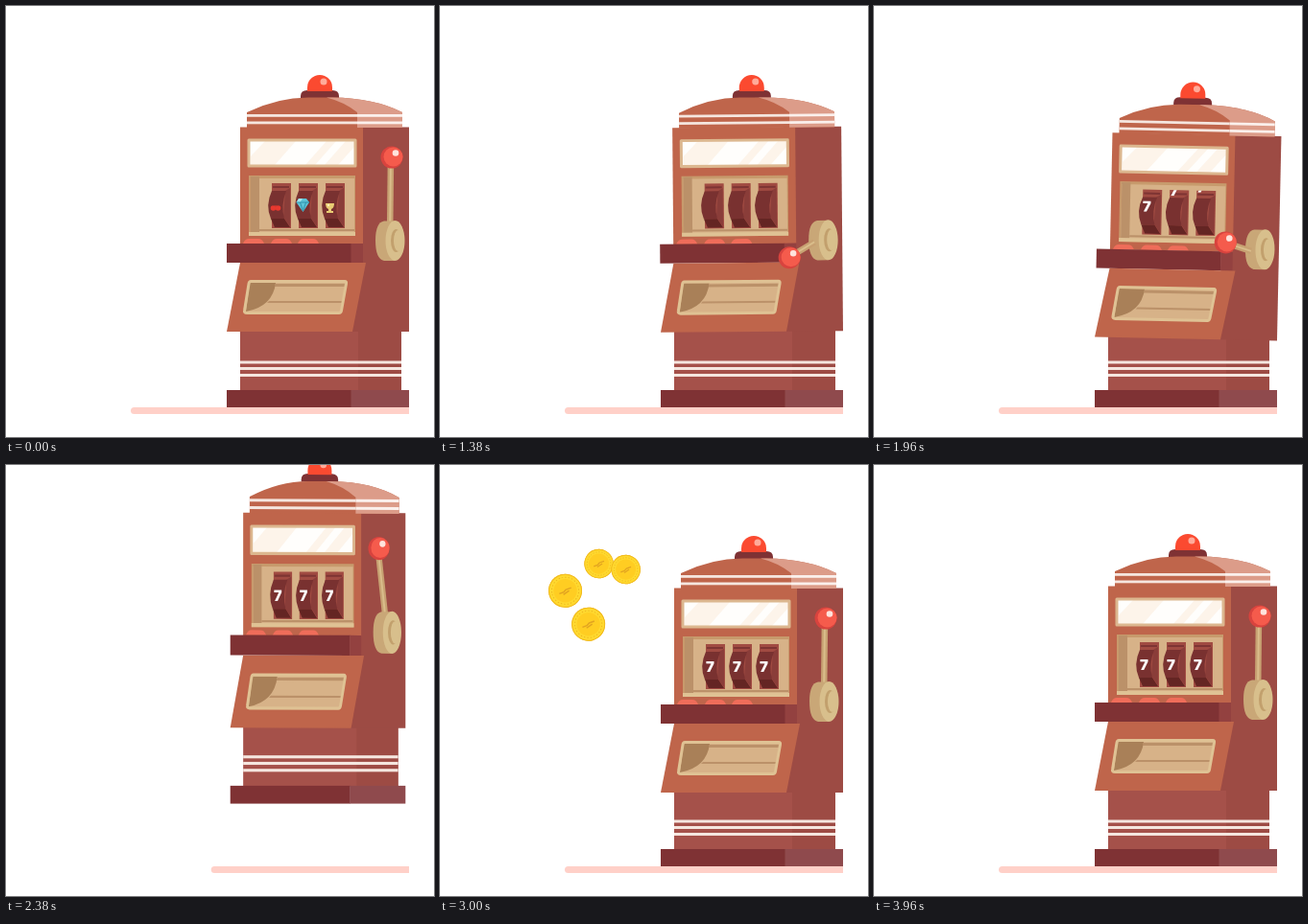
Write an HTML page with a canvas that moves like this. It is 446 px wide and 450 px high and loops after 4 s.

```html
<!DOCTYPE html>
<html lang="en">
<head>
<meta charset="utf-8">
<title>Slot machine</title>
<style>
html, body { margin: 0; width: 100%; height: 100%; overflow: hidden; background: #fff; }
canvas { display: block; }
</style>
</head>
<body>
<canvas id="stage" width="446" height="450"></canvas>
<script>
const ctx = document.getElementById('stage').getContext('2d');
const LOOP = 4000;
const C = {
  front: '#bf654b', side: '#9d4b44', dark: '#7f3234', body: '#a5514a', cream: '#f5e6df',
  tan: '#d7b288', tanDark: '#bb9169', tanLight: '#dfc294', red: '#fb4a30', pink: '#ffd0c8'
};

// Eased value at time t from a list of time, value pairs
function key(t, ...k) {
  if (t <= k[0]) return k[1];
  for (let i = 2; i < k.length; i += 2) {
    if (t < k[i]) {
      const u = (t - k[i - 2]) / (k[i] - k[i - 2]);
      return k[i - 1] + (k[i + 1] - k[i - 1]) * u * u * (3 - 2 * u);
    }
  }
  return k[k.length - 1];
}

function rect(color, x, y, w, h) {
  ctx.fillStyle = color;
  ctx.fillRect(x, y, w, h);
}
function shape(color, d) {
  ctx.fillStyle = color;
  ctx.fill(new Path2D(d));
}
function outline(color, width, d) {
  ctx.strokeStyle = color;
  ctx.lineWidth = width;
  ctx.lineJoin = 'round';
  ctx.stroke(new Path2D(d));
}
function oval(color, x, y, rx, ry = rx) {
  ctx.fillStyle = color;
  ctx.beginPath();
  ctx.ellipse(x, y, rx, ry, 0, 0, 7);
  ctx.fill();
}
// Draws inside a group turned, slanted and scaled about (x, y), moved down by dy
function group(x, y, { dy = 0, deg = 0, slant = 0, sx = 1, sy = 1 }, draw) {
  ctx.save();
  ctx.translate(x, y + dy);
  ctx.rotate(deg * Math.PI / 180);
  ctx.transform(1, slant, 0, 1, 0, 0);
  ctx.scale(sx, sy);
  ctx.translate(-x, -y);
  draw();
  ctx.restore();
}

function ground(lift) {
  const x = 130 + lift * 1.28;
  ctx.fillStyle = C.pink;
  ctx.beginPath();
  ctx.roundRect(x, 419, 420 - x, 7, [3.5, 0, 0, 3.5]);
  ctx.fill();
}

function ring(t) {
  const u = (t - 2480) / 190;
  if (u < 0 || u > 1.7) return;
  ctx.save();
  ctx.globalAlpha = key(u, 1.2, 1, 1.7, 0);
  ctx.strokeStyle = '#fbbab2';
  ctx.lineWidth = 3.5;
  ctx.beginPath();
  ctx.ellipse(330, 44, 300 * u, 8.5 * u, 0.056, 0, 7);
  ctx.stroke();
  ctx.restore();
}

function base() {
  rect(C.body, 244, 290, 168, 112);
  rect(C.side, 367, 290, 45, 112);
  for (const y of [370.5, 377, 384]) rect(C.cream, 244, y, 168, 3);
  rect(C.dark, 230, 401, 130, 18);
  rect('#8f4a4d', 359.5, 401, 60.5, 18);
}

function roof() {
  shape(C.dark, 'M307 96v-2q0-6 7-6h26q7 0 7 6v2z');
  shape(C.red, 'M314 89v-4a13 13 0 0 1 26 0v4z');
  oval('#ffab9a', 331, 79, 3.5);
  shape(C.front, 'M251 127V111Q283 95.500 315 95.500H340Q384 96 413 111V127z');
  shape('#dc9c89', 'M334 95.500H340Q384 96 413 111V127H366V111Q352 100 334 95.500z');
  for (const y of [113, 120.5]) {
    rect(C.cream, 251, y, 115, 2.8);
    rect('#fbf0ec', 366, y, 47, 2.8);
  }
}

function sign() {
  rect('#fffefc', 253, 140, 111, 27);
  shape('#fdf4ea', 'M255 166V157L270 141H302L280 166zM312 166L334 141H344L322 166zM332 166L354 141H363V147L346 166z');
  outline('#dcb78f', 3, 'M253 140H364V167H253z');
}

const icons = [
  () => {
    oval('#e8392f', 278.500, 211, 2.8);
    oval('#e8392f', 283.500, 211, 2.8);
    outline('#b9342d', 1, 'M278 208.500h6');
  },
  () => {
    shape('#5cc3d6', 'M302.500 205L305 201H313L316 205L309.500 215z');
    shape('#a5e6ec', 'M302.500 205L305 201H309L306.500 205z');
    outline('#2f93ab', 1, 'M303 205H316M306.500 205L309.500 214L312.500 205');
  },
  () => {
    shape('#e9cd74', 'M333 206h9q0 5-3 6v2h2v2h-7v-2h2v-2q-3-1-3-6z');
    oval('#fff0b5', 336, 208, 1.2);
  }
];

function seven(x) {
  ctx.fillStyle = '#fff';
  ctx.font = '900 15px Inter, "Liberation Sans", sans-serif';
  ctx.textAlign = 'center';
  ctx.fillText('7', x, 214);
}

function reel(i, t) {
  const x = i * 28;
  ctx.save();
  ctx.translate(x, 0);
  rect('#a14b42', 277, 185, 20, 47);
  rect('#7e3433', 278, 188, 17, 2);
  shape('#8a3d39', 'M291 193L296 190V230L289 220z');
  shape('#793130', 'M277 193Q270 208 276 222H290Q286 208 292 193z');
  shape('#642523', 'M276 222H290L296 231H280z');
  ctx.beginPath();
  ctx.rect(272, 185, 25, 47);
  ctx.clip();
  const stop = [1890, 1930, 1942][i];
  if (t < 1100) {
    ctx.translate(-x, key(t, 960 + i * 20, 0, 1080, 34));
    icons[i]();
  } else {
    ctx.translate(0, key(t, stop, -30, stop + 100, 0));
    seven(281.500);
  }
  ctx.restore();
}

function windowBox(t) {
  rect('#c79a6c', 253, 177, 111, 63);
  rect(C.tan, 255, 180, 108, 57);
  rect(C.tanDark, 255, 178, 9, 60);
  rect(C.tanDark, 264, 233, 99, 2);
  rect(C.tanLight, 253, 236, 111, 4);
  for (let i = 0; i < 3; i++) reel(i, t);
}

function tray() {
  const frame = 'M255 287.500H353Q355 287.500 354.500 290L349.500 318Q349 320.500 347 320.500H251Q248 320.500 248.500 318L253 290Q253.500 287.500 255 287.500z';
  shape(C.tan, frame);
  shape(C.tanDark, 'M281 290H354L353 293H280zM274 308H352L351.500 310H272z');
  shape('#a98058', 'M254 289H281Q278 314 250 319z');
  outline(C.tanLight, 3, frame);
}

function lever(angle) {
  const a = angle * Math.PI / 180;
  const x = 402 - 38 * Math.sin(a), y = 245 - 87 * Math.cos(a);
  const forward = angle > 60;
  const rod = () => {
    const from = forward ? '391 247' : '400 245';
    outline('#c7a172', 6.5, `M${from}L${x - 1} ${y}`);
    outline('#d9bd8b', 2, `M${from}L${x - 1} ${y}`);
  };
  if (!forward) rod();
  shape('#c9a777', 'M394 224.500H405V266H394Q385 264 385 245T394 224.500z');
  oval('#d8bf8c', 405.500, 245, 10, 21);
  oval('#c2a06d', 406.500, 245, 5.500, 12);
  oval('#d8bf8c', 408.500, 245, 4.500, 11);
  if (forward) rod();
  oval('#d8433e', x, y, 11.5);
  oval('#f55b4c', x + 1.5, y - 0.5, 10);
  oval('#ffe3dc', x + 4, y - 4.5, 3.3);
}

function cabinet(t, head) {
  rect(C.side, 360, 126.500, 60, 213.500);
  rect(C.front, 244, 126.500, 128, 122);
  group(331, 127, head, roof);
  sign();
  windowBox(t);
  for (const x of [258, 287, 315]) shape('#ef6d5a', `M${x - 11} 248q2-5 6-5h10q4 0 6 5z`);
  rect(C.dark, 230, 248, 130, 20);
  rect('#934140', 359.500, 248, 12.500, 20);
  shape(C.front, 'M244 268H375L361 340H230z');
  tray();
  lever(key(t, 0, 0, 500, -85, 617, -85, 1090, 103, 1380, 102, 1745, 102, 2600, 0));
}

// Place at 2670 ms, place at 3000 ms, size; gravity does the rest
const coins = [
  [302, 222, 166, 103, 0.87], [309, 218, 194, 109, 0.87],
  [280, 178, 131, 131, 1], [269, 231, 155, 166, 1]
];
const GRAVITY = 2500, SPAN = 0.33;

function coin([x0, y0, x1, y1, size], t) {
  const s = (t - 2670) / 1000;
  if (s < -0.11) return;
  const vy = (y1 - y0) / SPAN - GRAVITY * SPAN / 2;
  const x = x0 + (x1 - x0) * s / SPAN;
  const y = y0 + vy * s + GRAVITY * s * s / 2;
  if (y > 420 && s > 0) return;
  const r = size * key(s, -0.11, 4, -0.04, 22, 0, 22, SPAN, 17.5);
  const turn = Math.max(0.12, Math.abs(Math.cos(0.95 * (1 - s / SPAN))));
  const edge = 3 * Math.sqrt(1 - turn * turn);
  ctx.save();
  ctx.translate(x, y);
  ctx.rotate(-0.26);
  oval('#eeb31a', edge, 0, r * turn, r);
  ctx.scale(turn * r / 18, r / 18);
  oval('#f3bd1d', 0, 0, 18);
  oval('#ffd92f', 0, 0, 17);
  ctx.setLineDash([1.5, 2]);
  outline('#eeb720', 1, 'M-14.500 0a14.500 14.500 0 1 0 29 0a14.500 14.500 0 1 0-29 0');
  ctx.setLineDash([]);
  oval('#ffcd22', 0, 0, 12.5);
  outline('#e2a421', 1.5, 'M-7 1.500L-2 1L1 -1L7 -1.500M-3 3.500L4 1');
  ctx.restore();
}

function draw(t) {
  const lift = 70 * Math.max(0, 1 - ((t - 2450) / 270) ** 2);
  const sx = key(t, 2190, 1, 2400, 0.96, 2670, 0.96, 2760, 1);
  const twist = key(t, 2300, 0, 2670, 1, 2850, 0);
  const upper = {
    dy: -lift + key(t, 1400, 0, 1640, 7.5, 1960, 7.5, 2040, 13, 2175, -28, 2320, 0,
      2600, 0, 2670, 1.5, 2800, 12, 3000, 2, 3300, -2, 3600, 1, 3900, 0),
    deg: key(t, 1100, 0, 1380, -0.5, 1640, 1.2, 1960, 1.2, 2175, 0),
    slant: 0.018 * twist,
    sx,
    sy: key(t, 2040, 1, 2175, 1.15, 2400, 1.05, 2670, 1.05, 2780, 0.98, 2990, 1)
  };
  const head = { slant: 0.03 * twist, sy: 1 + 0.08 * twist };
  ctx.fillStyle = '#fff';
  ctx.fillRect(0, 0, 446, 450);
  ground(lift);
  ring(t);
  group(325, 419, { dy: -lift, sx, sy: 2 - sx }, base);
  group(325, 340, upper, () => cabinet(t, head));
  for (const c of coins) coin(c, t);
}

function tick() {
  draw(performance.now() % LOOP);
  requestAnimationFrame(tick);
}
tick();
</script>
</body>
</html>
```
